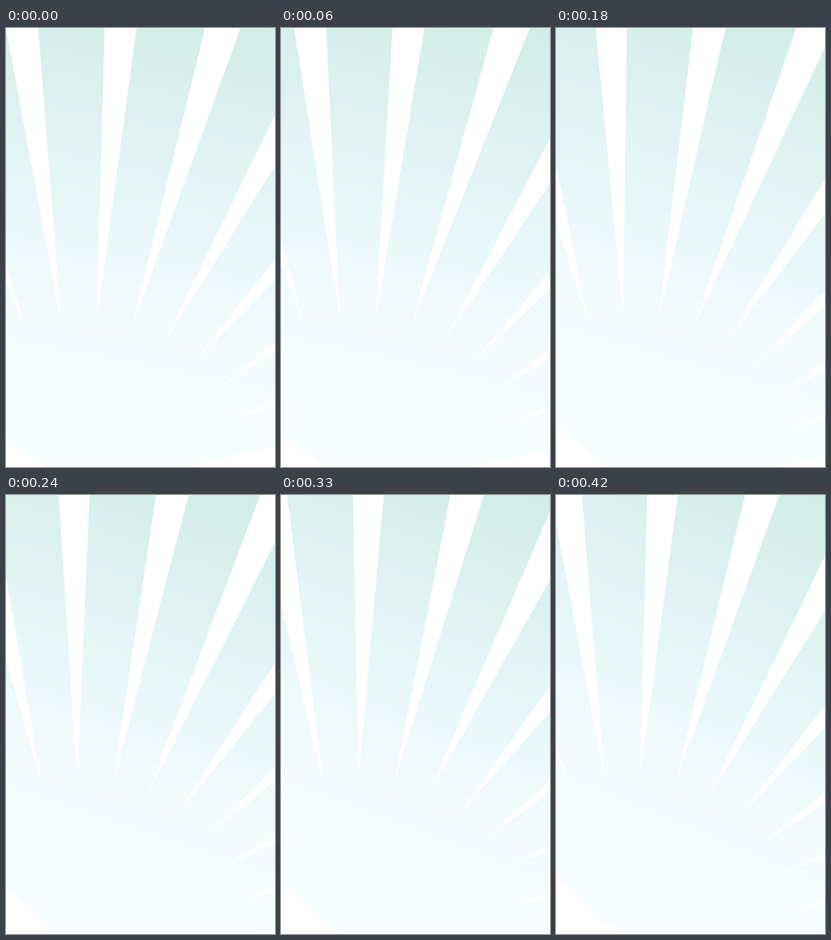
These frames come from a looping animation (587 px wide and 954 px high, 450 ms). An HTML page:

```html
<!DOCTYPE html>
<html lang="en">
<head>
<meta charset="utf-8">
<title>Rotating sunburst</title>
<style>
  html, body { margin: 0; width: 100%; height: 100%; overflow: hidden; background: #fff; }
  svg { display: block; width: 587px; height: 954px; }
  #spin { transform-origin: 274px 924px; }
</style>
</head>
<body>
<svg viewBox="0 0 587 954" width="587" height="954">
  <defs>
    <linearGradient id="sky" gradientUnits="userSpaceOnUse" x1="0" y1="-1065" x2="0" y2="-240">
      <stop offset="0" stop-color="#d1ede8"/>
      <stop offset=".54" stop-color="#e6f6f6"/>
      <stop offset=".78" stop-color="#f0fafc"/>
      <stop offset="1" stop-color="#f6fcff"/>
    </linearGradient>
  </defs>
  <g id="spin">
    <g id="fan" transform="translate(168 1001) rotate(10.8)">
      <path fill="url(#sky)" d="M-69-23.4L-1500-672.5V-1600H1500V-672.5L69-23.4Z"/>
    </g>
  </g>
</svg>
<script>
  const GAP = 12.24, INNER = 367, LENGTH = 1400, HALF_ANGLE = 3.12;
  const TURN = 13, STEPS = 15, LOOP = 450;
  const fan = document.getElementById('fan');
  const half = LENGTH * Math.tan(HALF_ANGLE * Math.PI / 180);

  // White spikes between the eleven beams
  for (let i = -4.5; i <= 4.5; i++) {
    const spike = document.createElementNS(fan.namespaceURI, 'path');
    spike.setAttribute('d', `M0 ${-INNER}l${-half} ${-LENGTH}h${2 * half}z`);
    spike.setAttribute('transform', `rotate(${i * GAP})`);
    spike.setAttribute('fill', '#fff');
    fan.append(spike);
  }

  document.getElementById('spin').animate(
    [{ transform: 'rotate(0deg)' }, { transform: `rotate(${TURN}deg)` }],
    { duration: LOOP, iterations: Infinity, easing: `steps(${STEPS}, end)` }
  );
</script>
</body>
</html>
```
